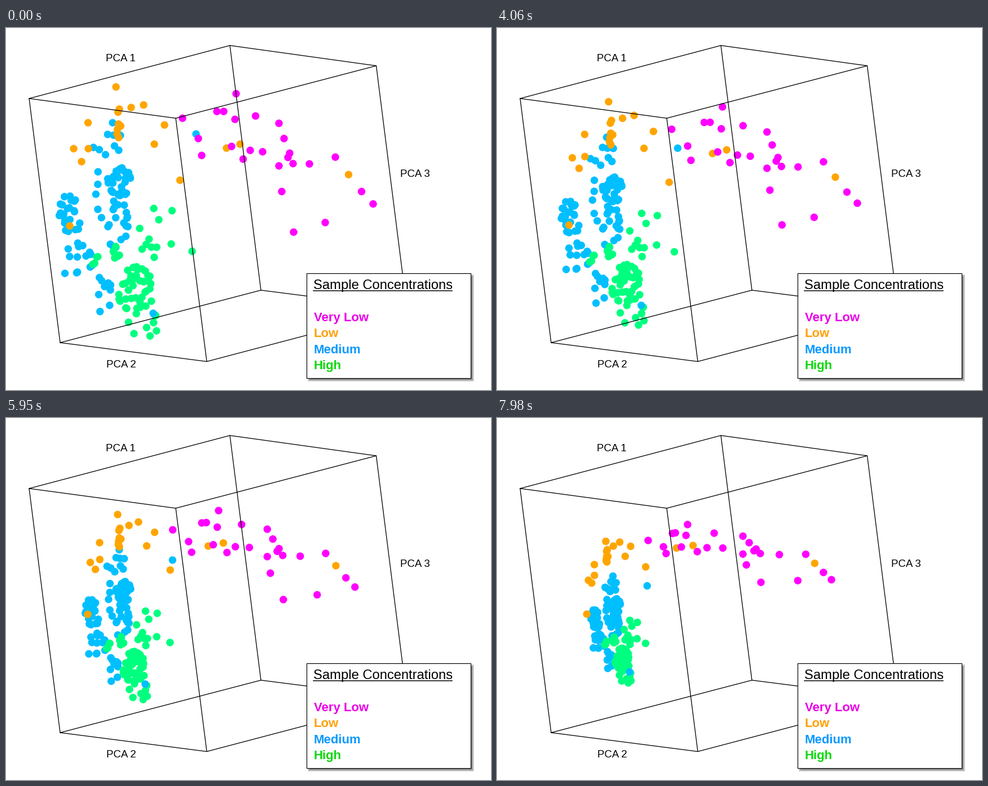
Recreate the animation shown at these times as a matplotlib script. Size 860x642 px, loop 8 s.

```python
import numpy as np
import matplotlib.pyplot as plt
from matplotlib.animation import FuncAnimation
from matplotlib.patches import Rectangle

W, H, DPI = 860, 642, 100
LOOP, STEP = 8000, 40
START, FIRST_MOVE, TICK = 2730, 2870, 70

BLUE, GREEN, ORANGE, MAGENTA = "#00bfff", "#00ff7f", "#ffa500", "#ff00ff"
rng = np.random.default_rng(4)


def blob(n, cx, cy, rx, ry):
    """Evenly spread random points in an ellipse."""
    r, a = np.sqrt(rng.random(n)), rng.uniform(0, 2 * np.pi, n)
    return np.column_stack([cx + rx * r * np.cos(a), cy + ry * r * np.sin(a)])


def shrink(p):
    """Where the dense cloud ends: it closes in on its middle."""
    x, y = p.T
    return np.column_stack([165 + .41 * (x - 90),
                            281 + .492 * (y - 168) + .05 * (x - 200)])


def swing(p):
    """Where the arch of weak samples ends; its drift depends on x."""
    x, y = p.T
    drift = np.interp(x, [110, 200, 280, 345, 395, 440, 510, 570, 650],
                      [48, -5, -44, -46, -75, -58, -42, -32, -58])
    return np.column_stack([x + drift,
                            235 + .42 * (y - 230) + .0005 * (x - 465) ** 2])


medium = np.vstack([
    blob(28, 203, 271, 23, 26), blob(8, 173, 202, 35, 24),
    blob(22, 115, 330, 26, 40), blob(14, 124, 408, 34, 36),
    blob(20, 198, 346, 19, 52), blob(5, 163, 310, 14, 60),
    blob(10, 171, 473, 18, 34), [(189, 168), (337, 188)]])
high = np.vstack([
    blob(36, 230, 462, 35, 40), blob(14, 230, 392, 42, 38),
    blob(11, 240, 522, 38, 32), blob(4, 170, 407, 18, 32),
    [(262, 320), (294.5, 324), (271, 340), (293, 383), (330, 396)]])
low = np.vstack([
    blob(7, 201, 180, 9, 40),
    [(195, 104.5), (222, 141), (244, 136.5), (281, 172), (263, 206),
     (308.5, 270), (145.5, 168), (146, 214), (120, 214), (134, 237),
     (113, 351), (391, 213), (415, 206), (607.5, 260)]])
very_low = np.array([
    (408, 116.5), (313, 160), (374, 148), (386, 148), (406, 162),
    (442.5, 156), (484, 169), (493, 196), (341, 196), (347, 226),
    (400, 210), (433, 217), (455, 219.5), (420.5, 232.5), (503, 222),
    (500, 229.5), (509, 240.5), (484, 244.5), (538, 241), (584, 229),
    (489, 290), (630.5, 290), (651, 312), (566, 345), (510, 362)])

groups = [(medium, BLUE), (high, GREEN), (np.array([(261, 506)]), BLUE),
          (low, ORANGE), (very_low, MAGENTA)]
begin = np.vstack([p for p, _ in groups])
colors = np.concatenate([[c] * len(p) for p, c in groups])
warm = np.isin(colors, [ORANGE, MAGENTA])
end = np.where(warm[:, None], swing(begin), shrink(begin))

# Paths bow sideways, and up or down depending on the side of the box.
x0, y0 = begin.T
right = warm & (x0 > 300)
bend = np.where(warm, np.interp(x0, [110, 200, 280, 400, 520, 650],
                                [15, 18, 40, 52, 30, 14]), 7)
lift = np.where(right, 36, 0)
sag = np.where(right, 0, 14 * np.clip((400 - y0) / 200, 0, 1))


def positions(t):
    t = t // TICK * TICK
    s = 0 if t < FIRST_MOVE else (t - START) / (LOOP - 20 - START)
    arc = s * (1 - s)
    p = begin + (end - begin) * s
    p[:, 0] += bend * arc
    p[:, 1] += lift * arc * (1 - s) - sag * arc
    return p


def px(n):
    return n * 72 / DPI


plt.rcParams["font.family"] = "Liberation Sans"
fig = plt.figure(figsize=(W / DPI, H / DPI), dpi=DPI, facecolor="white")
ax = fig.add_axes([0, 0, 1, 1])
ax.set(xlim=(0, W), ylim=(H, 0))
ax.axis("off")

dots = ax.scatter(x0, y0, s=px(13.4) ** 2, c=colors, linewidths=0, zorder=2)


def label(x, y, text, size, color="black", weight="normal"):
    ax.text(x, y, text, fontsize=px(size), color=color, weight=weight,
            va="baseline", zorder=6)


# Box
top = np.array([(41, 125), (397, 31), (656.5, 67), (301, 160)])
bottom = np.array([(96, 558), (452, 465), (711, 498), (356, 591.5)])
edge = dict(color="black", lw=px(1.3), zorder=3, solid_capstyle="round")
for face in (top, bottom):
    ax.plot(*np.vstack([face, face[:1]]).T, **edge)
for a, b in zip(top, bottom):
    ax.plot(*np.array([a, b]).T, **edge)

label(177, 59, "PCA 1", 18.6)
label(177.5, 602, "PCA 2", 18.6)
label(699, 264, "PCA 3", 18.6)

# Legend with a soft shadow
for i in range(6):
    ax.add_patch(Rectangle((535 + i, 437 + i), 295 - 2 * i, 190 - 2 * i,
                           fc="black", alpha=.12, lw=0, zorder=4))
ax.add_patch(Rectangle((532.5, 434.5), 291, 186, fc="white", ec="black",
                       lw=px(1.2), zorder=5))
label(545, 463, "Sample Concentrations", 23.7)
ax.plot([545, 791], [465.5, 465.5], color="black", lw=px(1.5), zorder=6)
entries = [("Very Low", "#ea00ea"), ("Low", "#ffa00a"),
           ("Medium", "#0a99ff"), ("High", "#0ad80a")]
for i, (text, color) in enumerate(entries):
    label(545.5, 520 + 28.4 * i, text, 22.2, color, "bold")


def update(i):
    dots.set_offsets(positions(i * STEP + STEP - 1))
    return dots,


anim = FuncAnimation(fig, update, frames=LOOP // STEP, interval=STEP,
                     repeat=True, repeat_delay=0, blit=False)
plt.show()
```
